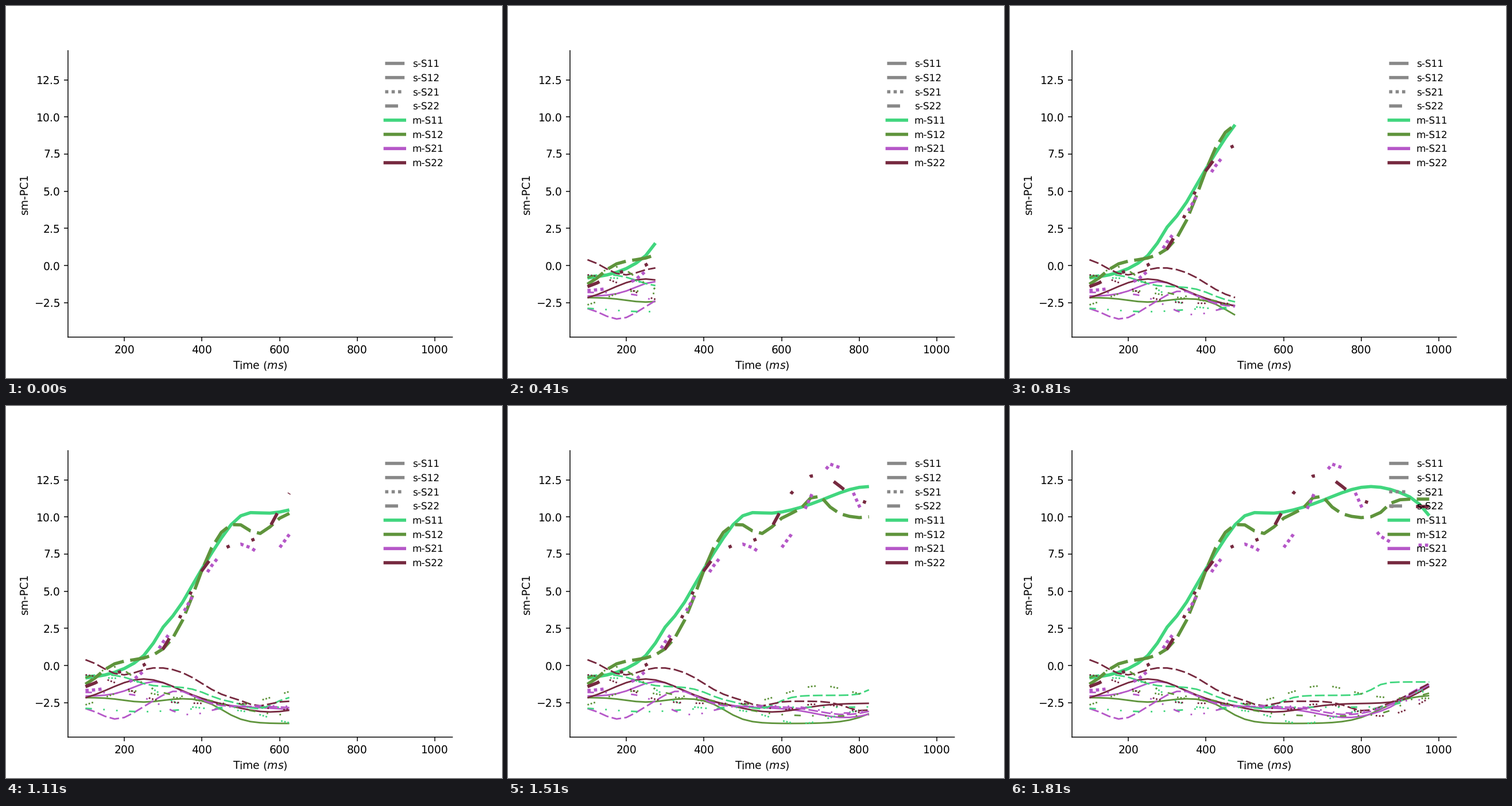
A matplotlib script for the animation above (1.86 s loop, 864 px wide and 648 px high).

```python
import numpy as np
import matplotlib.pyplot as plt
from matplotlib.animation import FuncAnimation
from matplotlib.lines import Line2D

plt.rcParams.update({"path.snap": False, "text.hinting": "none"})

NAMES = ["S11", "S12", "S21", "S22"]
COLORS = ["#41d67e", "#5f943c", "#b557c8", "#76293f"]
STYLES = ["-", (0, (6, 2)), (0, (1, 1, 1, 1, 1, 9)), (0, (4, 7, 1, 7, 1, 7))]
THICK, THIN = 3, 1.5
TICK, STEP, HOLD, LOOP = 10, 50, 110, 1860

t = np.arange(100, 1000, 25)


def rise(center, width, height):
    """Logistic step."""
    return height / (1 + np.exp((center - t) / width))


def bump(center, width, height):
    """Gaussian bump, or a dip if height is negative."""
    return height * np.exp(-((t - center) / width) ** 2 / 2)


def late(center):
    """Recovery shared by the weak responses."""
    return rise(center, 28, 1.7)


# One row per stimulus (line style), one column per model (color);
# the diagonal holds the strong responses.
responses = [
    [
        -1 + rise(360, 62, 11.4) + bump(300, 20, .45) + bump(500, 40, .75)
        + bump(825, 100, 1.65) + bump(1000, 30, -1.2),
        -2.15 + bump(250, 50, -.3) + rise(455, 28, -1.75) + rise(850, 38, 1.95),
        -2.05 + bump(280, 55, 1) + rise(420, 40, -.8) + bump(765, 75, -.65)
        + late(920),
        -2.55 + bump(250, 88, 1.65) + bump(575, 75, -.57) + late(955),
    ],
    [
        -.8 + bump(150, 40, .2) + rise(235, 18, -.6) + rise(415, 25, -1.1)
        + bump(545, 30, -.45) + rise(605, 20, .5) + rise(830, 14, .9),
        .3 + bump(90, 42, -1.6) + rise(384, 35, 10) + bump(547, 33, -1.33)
        + bump(690, 24, 1.2) + bump(805, 40, -.35) + rise(863, 10, .9),
        -2.75 + bump(180, 42, -.85) + bump(337, 48, 1.05)
        + bump(765, 70, -.55) + late(920),
        bump(90, 35, .45) + bump(195, 40, -.62) + rise(400, 36, -2.4)
        + bump(545, 28, -.35) + bump(810, 42, -.65) + late(950),
    ],
    [
        -.8 + rise(290, 30, -2.1) + bump(650, 75, -1) + late(925),
        -2.2 + bump(90, 40, -.5) + bump(220, 55, .5) + bump(480, 60, -.45)
        + bump(700, 70, .85),
        -1.75 + rise(345, 50, 9.85) + bump(295, 25, .5) + bump(475, 38, .65)
        + bump(572, 28, -.75) + bump(732, 56, 5.5),
        -.5 + rise(205, 38, -2.05) + bump(600, 35, -.45)
        + bump(850, 60, -.85) + rise(970, 18, .8),
    ],
    [
        -2.8 + bump(250, 90, -.3) + late(945),
        -.9 + bump(175, 35, .85) + rise(265, 25, -1.1) + rise(475, 50, -1.4)
        + late(910),
        -1.8 + rise(270, 30, -.9) + bump(365, 50, -.65) + bump(760, 60, -.5)
        + rise(880, 15, .4),
        -.4 + bump(90, 45, -1.05) + rise(356, 36, 8.8) + rise(590, 16, 2.3)
        + bump(693, 60, 2.15),
    ],
]

fig, ax = plt.subplots(figsize=(6.4, 4.8), dpi=135)
ax.set(xlim=(55, 1045), ylim=(-4.808, 14.46), ylabel="sm-PC1",
       xlabel="Time ($ms$)")
ax.spines[["top", "right"]].set_visible(False)

curves = []
for s, style in enumerate(STYLES):
    for m, color in enumerate(COLORS):
        line, = ax.plot([], [], color=color, ls=style,
                        lw=THICK if s == m else THIN, solid_capstyle="butt")
        curves.append((line, responses[s][m]))

handles = [Line2D([], [], color="#888888", lw=THICK, ls=style,
                  solid_capstyle="butt", label=f"s-{name}")
           for style, name in zip(STYLES, NAMES)]
handles += [Line2D([], [], color=color, lw=THICK, label=f"m-{name}")
            for color, name in zip(COLORS, NAMES)]
ax.legend(handles=handles, loc="upper right", fontsize=9, frameon=False,
          labelspacing=.49)


def update(frame):
    # Empty axes are held first, then one sample is added per step
    n = max(1, (frame * TICK - HOLD) // STEP + 2)
    for line, values in curves:
        line.set_data(t[:n], values[:n])
    return [line for line, _ in curves]


anim = FuncAnimation(fig, update, frames=LOOP // TICK, interval=TICK,
                     repeat=True, repeat_delay=0, blit=False)
plt.show()
```
